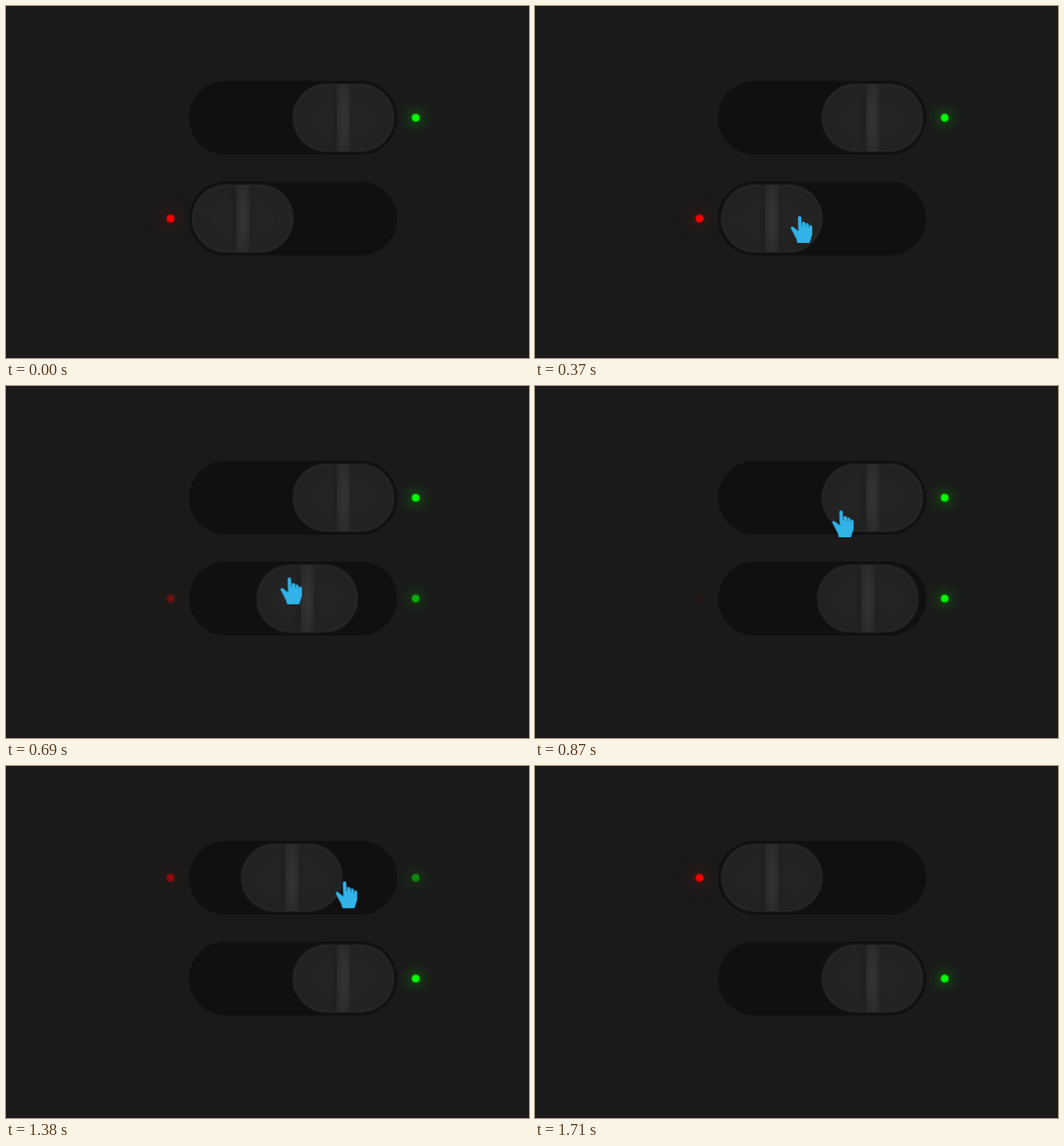
An HTML page for the animation above (1760 ms loop, 623 px wide and 419 px high).

```html
<!DOCTYPE html>
<html lang="en">
<head>
<meta charset="utf-8">
<title>Toggle switches</title>
<style>
  html, body { margin: 0; width: 100%; height: 100%; overflow: hidden; background: #1a1a1a; }
  .switch { position: absolute; left: 218px; width: 248px; height: 88px; }
  .track { position: absolute; inset: 0; border-radius: 44px; background: #101010; }
  .thumb {
    position: absolute; left: 4px; top: 4px; width: 120px; height: 80px;
    border-radius: 40px; overflow: hidden; background: #242424;
    box-shadow: inset 0 0 4px 1px #2b2b2b, inset 0 0 16px 1px #202020, 0 0 2px 1px #202020;
  }
  .thumb::before {
    content: ""; position: absolute; left: 44px; top: 0; width: 32px; height: 80px;
    background: linear-gradient(90deg, #24242400, #1f1f1f 22%, #2d2d2d 29%, #343434 50%, #2d2d2d 71%, #222 78%, #24242400);
    mask-image: linear-gradient(#0009, #000 35%, #000 65%, #0009);
  }
  .led {
    position: absolute; top: 40px; width: 8px; height: 8px; border-radius: 50%;
    background: rgb(var(--glow));
    box-shadow: 0 0 2px .6px rgb(var(--glow)),
                0 0 16px 3px rgb(var(--glow) / var(--power)),
                0 0 34px 10px rgb(var(--glow) / .06);
  }
  .red { left: -26px; --glow: 255 0 0; --power: .26; }
  .green { left: 266px; --glow: 0 255 0; --power: .38; }
  #cursor { position: absolute; left: 0; top: 0; width: 1px; height: 1px; overflow: visible; }
</style>
</head>
<body>
<div class="switch" id="upper" style="top:89px">
  <i class="led red"></i><i class="led green"></i>
  <div class="track"></div><div class="thumb"></div>
</div>
<div class="switch" id="lower" style="top:209px">
  <i class="led red"></i><i class="led green"></i>
  <div class="track"></div><div class="thumb"></div>
</div>
<svg id="cursor" fill="#31b3e8">
  <path id="arrow" d="M0 0V22L5 17.5L8.5 25L12 23.5L8.8 16H16Z"/>
  <path id="hand" transform="translate(.3 -.7)" d="M-2 2Q-1.7 0 0 0T2 2L2.7 12H3.2L3 7.6Q5 5.8 6.8 7.6L7.1 13H7.5L7.3 9.2Q9 7.4 10.8 9.2L11.1 14H11.5L11.4 11.2Q14 9.6 15 12.5V22L11.8 32H-2.5L-4 27L-10.4 14.8Q-10.4 11.2 -7.4 13L-1.5 18Z"/>
  <circle id="press" r="12" fill="#f8ee00" fill-opacity=".5"/>
</svg>
<script>
const LOOP = 1760, SLIDE = 500;
const find = selector => document.querySelector(selector);

// Each step is [time, value] or [time, value, easing to the next step].
function play(element, property, steps) {
  const frames = steps.map(([time, value, easing = "linear"]) =>
    ({ offset: time / LOOP, [property]: value, easing }));
  element.animate(frames, { duration: LOOP, iterations: Infinity });
}

function change(element, property, start, from, to) {
  play(element, property, [
    [0, from], [start, from, "ease"], [start + SLIDE, to], [LOOP, to]
  ]);
}

// Shows the element and hides it again at alternating times.
function flash(element, ...times) {
  const steps = times.map((time, i) => [time, 1 - i % 2, "step-end"]);
  play(element, "opacity", [[0, 0, "step-end"], ...steps, [LOOP, 0]]);
}

function toggle(id, start, turnsOn) {
  const shift = on => `translateX(${on * 120}px)`;
  const before = Number(!turnsOn), after = 1 - before;
  change(find(`#${id} .thumb`), "transform", start, shift(before), shift(after));
  change(find(`#${id} .green`), "opacity", start, before, after);
  change(find(`#${id} .red`), "opacity", start, after, before);
}

toggle("lower", 505, true);
toggle("upper", 1231, false);

const at = (x, y) => `translate(${x}px, ${y}px)`;
const entry = at(486, 400), lowerPress = at(313, 249);
const upperPress = at(393, 118), exit = at(578, 402);
play(find("#cursor"), "transform", [
  [0, entry], [40, entry, "ease-out"],
  [400, lowerPress], [510, lowerPress, "ease-in"],
  [690, at(337, 229)], [870, at(364, 149), "ease-out"],
  [1100, upperPress], [1231, upperPress, "ease-in"],
  [1380, at(403, 138), "ease-in-out"],
  [1660, exit], [LOOP, exit]
]);

// The pointer is a hand over a switch and an arrow elsewhere.
flash(find("#arrow"), 39, 220, 735, 807, 1458, 1705);
flash(find("#hand"), 220, 735, 807, 1458);
flash(find("#press"), 430, 510, 1145, 1231);
</script>
</body>
</html>
```
